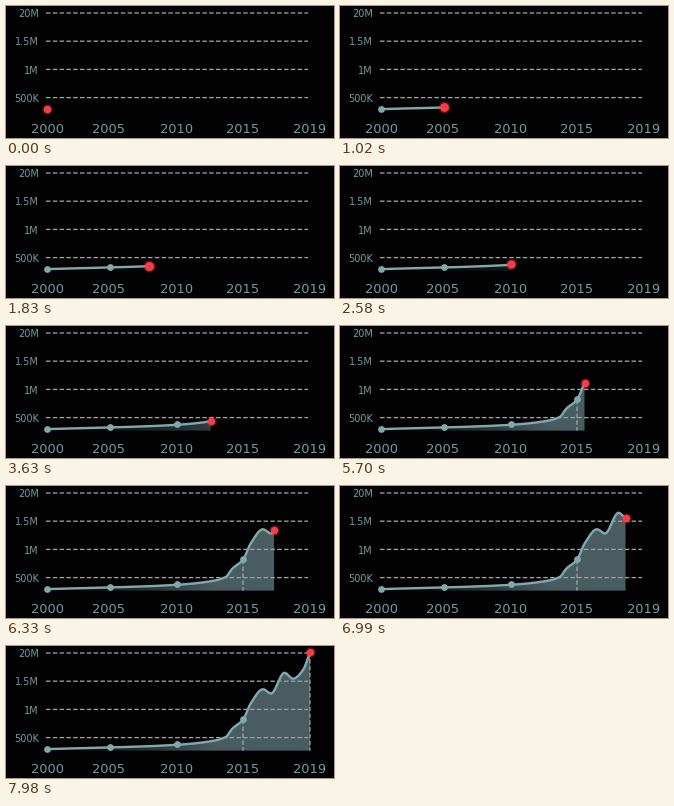
These frames come from a looping animation (328 by 132 pixels, 8 s). A matplotlib script:

```python
import numpy as np
import matplotlib.pyplot as plt
from matplotlib.animation import FuncAnimation
from matplotlib.path import Path

W, H, DPI = 328, 132, 64
PT = 72 / DPI  # points per pixel
LOOP, STEP = 8000, 32
BASE = 104.6
YEARS = {2000: 41, 2005: 104, 2010: 171, 2015: 237, 2019: 304}

BG, TEAL, LABEL, RED, GRID = "#020202", "#80a9af", "#709ca2", "#fb3c46", "#a2a2a2"


def smooth(points, q):
    """Monotone cubic through the points, flat at turning points."""
    x, y = np.array(points, float).T
    h, d = np.diff(x), np.diff(y) / np.diff(x)
    m = np.r_[d[0], np.zeros(len(d) - 1), d[-1]]
    for i in range(1, len(d)):
        if d[i - 1] * d[i] > 0:
            a, b = 2 * h[i] + h[i - 1], h[i] + 2 * h[i - 1]
            m[i] = (a + b) / (a / d[i - 1] + b / d[i])
    i = np.clip(np.searchsorted(x, q, side="right") - 1, 0, len(h) - 1)
    u = (q - x[i]) / h[i]
    return ((1 + 2 * u) * (1 - u) ** 2 * y[i] + u * (1 - u) ** 2 * h[i] * m[i]
            + u * u * (3 - 2 * u) * y[i + 1] + u * u * (u - 1) * h[i] * m[i + 1])


# the curve, and the length travelled along it
turns = [(41, 103.1), (104, 101.5), (171, 98.8), (205, 95.2), (220, 90.8),
         (226, 83), (237, 73.8), (244.5, 57.8), (257, 43.3), (265, 47.5),
         (278.5, 26.8), (287, 32.7), (297, 24), (304, 6.3)]
cx = np.linspace(41, 304, 1053)
cy = smooth(turns, cx)
length = np.r_[0, np.cumsum(np.hypot(np.diff(cx), np.diff(cy)))]


def height(x):
    return np.interp(x, cx, cy)


def in_out(u):
    return 4 * u ** 3 if u < 0.5 else 1 - 4 * (1 - u) ** 3


# start ms, end ms, where the leg ends, easing
legs = [(0, 900, 104, in_out), (1090, 2480, 171, in_out),
        (2480, 4820, 237, in_out), (4820, 6480, 273.5, lambda u: u * u),
        (6480, 7950, 304, lambda u: u)]


def travel(t):
    x = 41
    for start, end, goal, ease in legs:
        if t <= start:
            break
        a, b = np.interp([x, goal], cx, length)
        u = ease(min(1, (t - start) / (end - start)))
        x = np.interp(a + (b - a) * u, length, cx)
    return float(x)


fig = plt.figure(figsize=(W / DPI, H / DPI), dpi=DPI, facecolor=BG)
ax = fig.add_axes([0, 0, 1, 1])
ax.axis("off")


def dashed(xs, ys, width, color, z):
    return ax.plot(xs, ys, color=color, lw=width * PT, snap=False, zorder=z,
                   ls=(0, (4.5 / width, 2.3 / width)), dash_capstyle="butt")[0]


def label(x, y, text, size, ha):
    ax.text(x, y, text, color=LABEL, fontsize=size * PT, ha=ha,
            va="center_baseline", family="DejaVu Sans")


def disc(color, z, size=0, alpha=1):
    return ax.plot([], [], "o", color=color, ms=size * PT, mew=0,
                   alpha=alpha, zorder=z)[0]


for i, text in enumerate(["20M", "1.5M", "1M", "500K"]):
    y = 7 + 28.2 * i
    dashed([40, 302], [y, y], 1.3, GRID, 1)
    label(33, y + 0.1, text, 9.7, "right")
for year, x in YEARS.items():
    label(102.3 if year == 2005 else x, 121.8, str(year), 13, "center")
ax.plot([107, 108], [34.8, 34.8], color="#a82a38", lw=PT, zorder=1.5)

# area tint growing stronger to the right
tint = np.zeros((1, W, 4))
tint[..., :3] = np.array([132, 168, 174]) / 255
tint[0, :, 3] = 0.55 * np.clip((np.arange(W) - 60) / 150, 0, 1)
area = ax.imshow(tint, extent=(0, W, H, 0), aspect="auto",
                 interpolation="nearest", zorder=2)

line, = ax.plot([], [], color=TEAL, lw=2.4 * PT, solid_capstyle="butt",
                solid_joinstyle="round", zorder=4)
passed = []
for year, x in YEARS.items():
    if year >= 2015:
        passed.append((x, dashed([x, x], [height(x), BASE], 1, "#b4bdbf", 3)))
    if year < 2019:
        mark = disc(TEAL, 5, 6.8)
        mark.set_data([x], [height(x) - 0.6])
        passed.append((x, mark))
halo = disc(RED, 6, alpha=0.35)
dot = disc(RED, 7)

ax.set_xlim(0, W)
ax.set_ylim(H, 0)


def draw(frame):
    t = frame * STEP
    x = travel(t)
    xs = np.r_[cx[cx < x], x]
    ys = height(xs)

    line.set_data(xs, ys)
    outline = np.column_stack([np.r_[xs, x, 41], np.r_[ys, BASE, BASE]])
    area.set_clip_path(Path(outline), ax.transData)
    area.set_alpha(float(np.clip((t - 1300) / 3500, 0, 1)))
    area.set_visible(t > 1300)

    for px, item in passed:
        item.set_visible(x >= px - 0.1)
    radius = 3.6 + 0.9 * np.sin(np.pi * min(1, t / 3000))
    for item, extra in [(halo, 1.5), (dot, 0)]:
        item.set_data([x], [ys[-1] - 0.6])
        item.set_markersize(2 * (radius + extra) * PT)
    return [area, line, halo, dot] + [item for _, item in passed]


anim = FuncAnimation(fig, draw, frames=LOOP // STEP, interval=STEP,
                     repeat=True, repeat_delay=0, blit=False)
plt.show()
```
